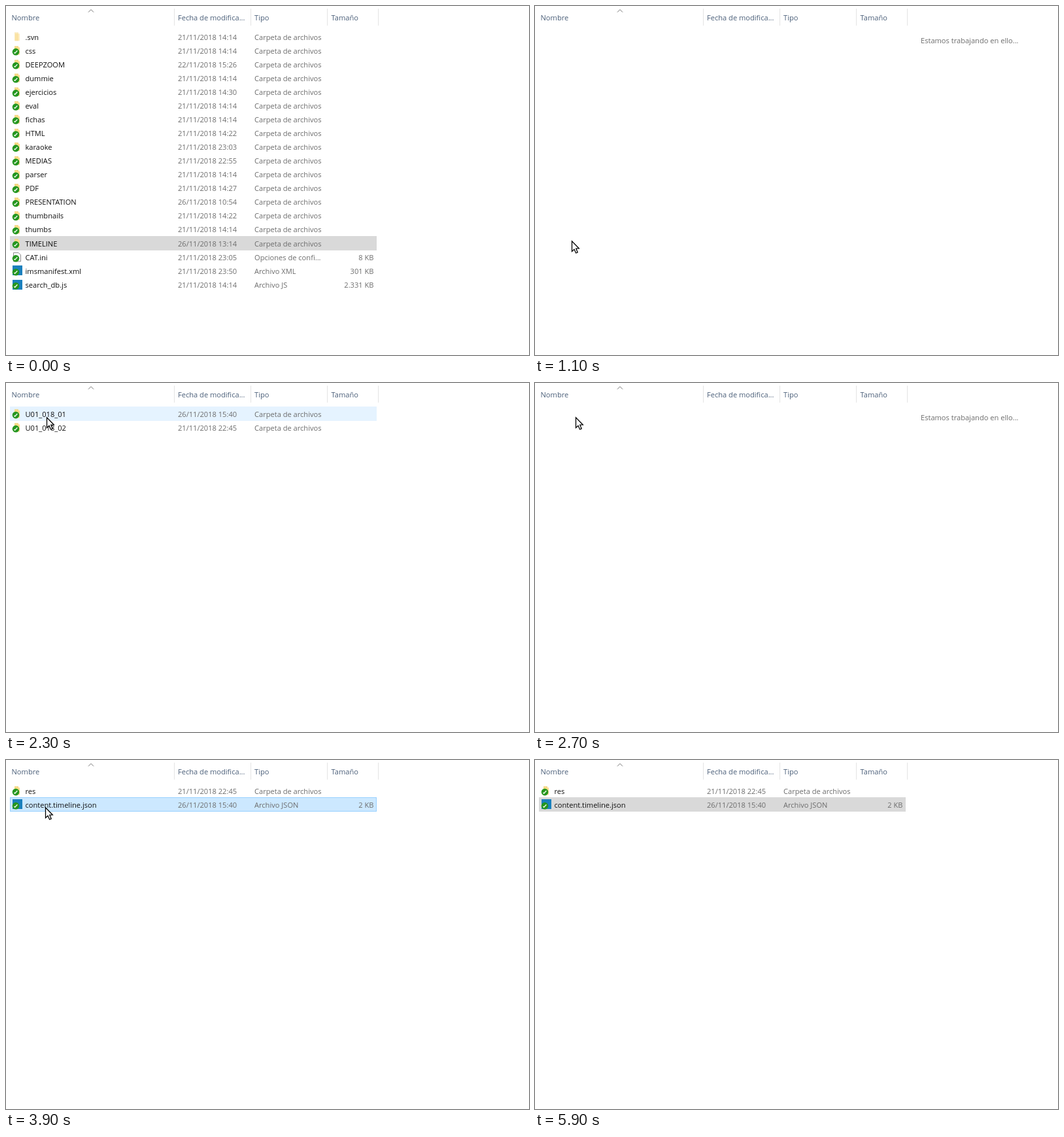
Write an HTML page with a canvas that moves like this. It is 800 by 534 pixels and loops after 6 s.

```html
<!DOCTYPE html>
<html lang="es">
<head>
<meta charset="utf-8">
<style>
  html, body { margin: 0; width: 100%; height: 100%; overflow: hidden; background: #fff; }
  canvas { display: block; }
</style>
</head>
<body>
<canvas id="stage" width="800" height="534"></canvas>
<script>
const ctx = document.getElementById('stage').getContext('2d');
const LOOP = 6000, STEP = 100;
const ROW_TOP = 36.3, ROW_HEIGHT = 21.07;

const folder = (name, date, icon = 'folder') =>
  ({ name, date, icon, type: 'Carpeta de archivos', size: '' });
const file = (name, date, type, size, icon = 'code') => ({ name, date, icon, type, size });

const rootRows = [
  folder('.svn', '21/11/2018 14:14', 'hidden'),
  folder('css', '21/11/2018 14:14'),
  folder('DEEPZOOM', '22/11/2018 15:26'),
  folder('dummie', '21/11/2018 14:14'),
  folder('ejercicios', '21/11/2018 14:30'),
  folder('eval', '21/11/2018 14:14'),
  folder('fichas', '21/11/2018 14:14'),
  folder('HTML', '21/11/2018 14:22'),
  folder('karaoke', '21/11/2018 23:03'),
  folder('MEDIAS', '21/11/2018 22:55'),
  folder('parser', '21/11/2018 14:14'),
  folder('PDF', '21/11/2018 14:27'),
  folder('PRESENTATION', '26/11/2018 10:54'),
  folder('thumbnails', '21/11/2018 14:22'),
  folder('thumbs', '21/11/2018 14:14'),
  folder('TIMELINE', '26/11/2018 13:14'),
  file('CAT.ini', '21/11/2018 23:05', 'Opciones de confi...', '8 KB', 'page'),
  file('imsmanifest.xml', '21/11/2018 23:50', 'Archivo XML', '301 KB'),
  file('search_db.js', '21/11/2018 14:14', 'Archivo JS', '2.331 KB')
];
const unitRows = [
  folder('U01_018_01', '26/11/2018 15:40'),
  folder('U01_018_02', '21/11/2018 22:45')
];
const contentRows = [
  folder('res', '21/11/2018 22:45'),
  file('content.timeline.json', '26/11/2018 15:40', 'Archivo JSON', '2 KB')
];

// Views by start time; "selected" is a row index, "focused" the selection's look.
const views = [
  { from: 0, rows: rootRows, selected: 15 },
  { from: 400, rows: rootRows, selected: 15, focused: true },
  { from: 1100, loading: true, rows: [] },
  { from: 1300, rows: unitRows },
  { from: 2700, loading: true, rows: [] },
  { from: 2900, rows: contentRows },
  { from: 3500, rows: contentRows, selected: 1, focused: true },
  { from: 5800, rows: contentRows, selected: 1 }
];

// Pointer path: time, x, y.
const path = [
  [100, 88, 472], [300, 64, 390], [400, 57, 363], [500, 56, 359],
  [1300, 56, 359], [1600, 48, 173], [1700, 50, 146], [2200, 62, 56], [2300, 62, 52],
  [3000, 62, 52], [3200, 60, 72], [4700, 60, 72], [5000, 88, 433]
];

function pointerAt(t) {
  if (t < path[0][0] || t > path[path.length - 1][0]) return null;
  const next = Math.max(1, path.findIndex(p => p[0] >= t));
  const [t0, x0, y0] = path[next - 1], [t1, x1, y1] = path[next];
  const k = (t - t0) / (t1 - t0);
  return { x: x0 + (x1 - x0) * k, y: y0 + (y1 - y0) * k };
}

function text(value, x, y, color, align = 'left') {
  ctx.fillStyle = color;
  ctx.textAlign = align;
  ctx.fillText(value, x, y);
}

function box(x, y, w, h, color) {
  ctx.fillStyle = color;
  ctx.fillRect(x, y, w, h);
}

function line(points, color, width) {
  ctx.beginPath();
  points.forEach(([x, y]) => ctx.lineTo(x, y));
  ctx.strokeStyle = color;
  ctx.lineWidth = width;
  ctx.stroke();
}

function drawHeader() {
  const color = '#4c607a';
  text('Nombre', 8.5, 22, color);
  text('Fecha de modifica...', 263, 22, color);
  text('Tipo', 380, 22, color);
  text('Tamaño', 497.5, 22, color);
  for (const x of [257, 374, 491, 569]) box(x, 4, 1, 26, '#e4e4e4');
  line([[126, 9.5], [130, 5.5], [134, 9.5]], '#767676', 1);
}

function drawBadge(y) {
  ctx.beginPath();
  ctx.arc(15, y + 1.8, 5.3, 0, Math.PI * 2);
  ctx.fillStyle = '#25961f';
  ctx.fill();
  line([[12.4, y + 2.6], [13.7, y + 3.8], [17.4, y - 0.2]], '#e8f6e6', 1.5);
}

function drawIcon(icon, y) {
  if (icon === 'hidden' || icon === 'folder') {
    ctx.globalAlpha = icon === 'hidden' ? 0.5 : 1;
    box(13, y - 7, 6, 13, '#f5d67f');
    box(14, y - 5, 7, 11, '#fbdd8b');
    ctx.globalAlpha = 1;
  } else if (icon === 'page') {
    ctx.beginPath();
    [[11.5, -7], [19, -7], [22.5, -3.5], [22.5, 6.5], [11.5, 6.5]]
      .forEach(([x, dy]) => ctx.lineTo(x, y + dy));
    ctx.closePath();
    ctx.fillStyle = '#fafafa';
    ctx.fill();
    ctx.strokeStyle = '#8e8e8e';
    ctx.lineWidth = 1;
    ctx.stroke();
  } else {
    box(10, Math.round(y - 8), 15, 15, '#1b80bd');
  }
  if (icon !== 'hidden') drawBadge(y);
}

function drawRow(row, index, view, hovered) {
  const top = ROW_TOP + index * ROW_HEIGHT;
  const y = top + 11, baseline = y + 4.2;
  const y0 = Math.round(top), h = 22;
  if (index === view.selected) {
    box(6, y0, 561, h, view.focused ? '#cce8ff' : '#d9d9d9');
    if (view.focused) {
      ctx.strokeStyle = '#99d1ff';
      ctx.lineWidth = 1;
      ctx.strokeRect(6.5, y0 + 0.5, 560, h - 1);
    }
  } else if (hovered) {
    box(6, y0, 561, h, '#e5f3ff');
  }
  drawIcon(row.icon, y);
  text(row.name, 29.5, baseline, '#111');
  text(row.date, 263, baseline, '#6d6d6d');
  text(row.type, 380, baseline, '#6d6d6d');
  text(row.size, 562.5, baseline, '#6d6d6d', 'right');
}

function drawPointer({ x, y }) {
  ctx.beginPath();
  [[0.5, 0.8], [0.5, 16.5], [4, 13.3], [6.6, 19], [9.2, 17.9], [6.8, 12.2], [11.3, 12]]
    .forEach(([dx, dy]) => ctx.lineTo(x + dx, y + dy));
  ctx.closePath();
  ctx.fillStyle = '#fff';
  ctx.fill();
  ctx.strokeStyle = '#000';
  ctx.lineWidth = 1.3;
  ctx.stroke();
}

function draw(t) {
  const view = views.filter(v => v.from <= t).pop();
  const pointer = pointerAt(t);
  const hover = pointer ? Math.floor((pointer.y - ROW_TOP) / ROW_HEIGHT) : -1;
  box(0, 0, 800, 534, '#fff');
  ctx.font = '11.1px "Open Sans", "Noto Sans", sans-serif';
  drawHeader();
  view.rows.forEach((row, i) => drawRow(row, i, view, i === hover));
  if (view.loading) text('Estamos trabajando en ello...', 590, 57, '#6d6d6d');
  if (pointer) drawPointer(pointer);
}

const start = performance.now();
function tick() {
  const t = (performance.now() - start) % LOOP;
  draw(Math.floor(t / STEP) * STEP);
  requestAnimationFrame(tick);
}
tick();
</script>
</body>
</html>
```
